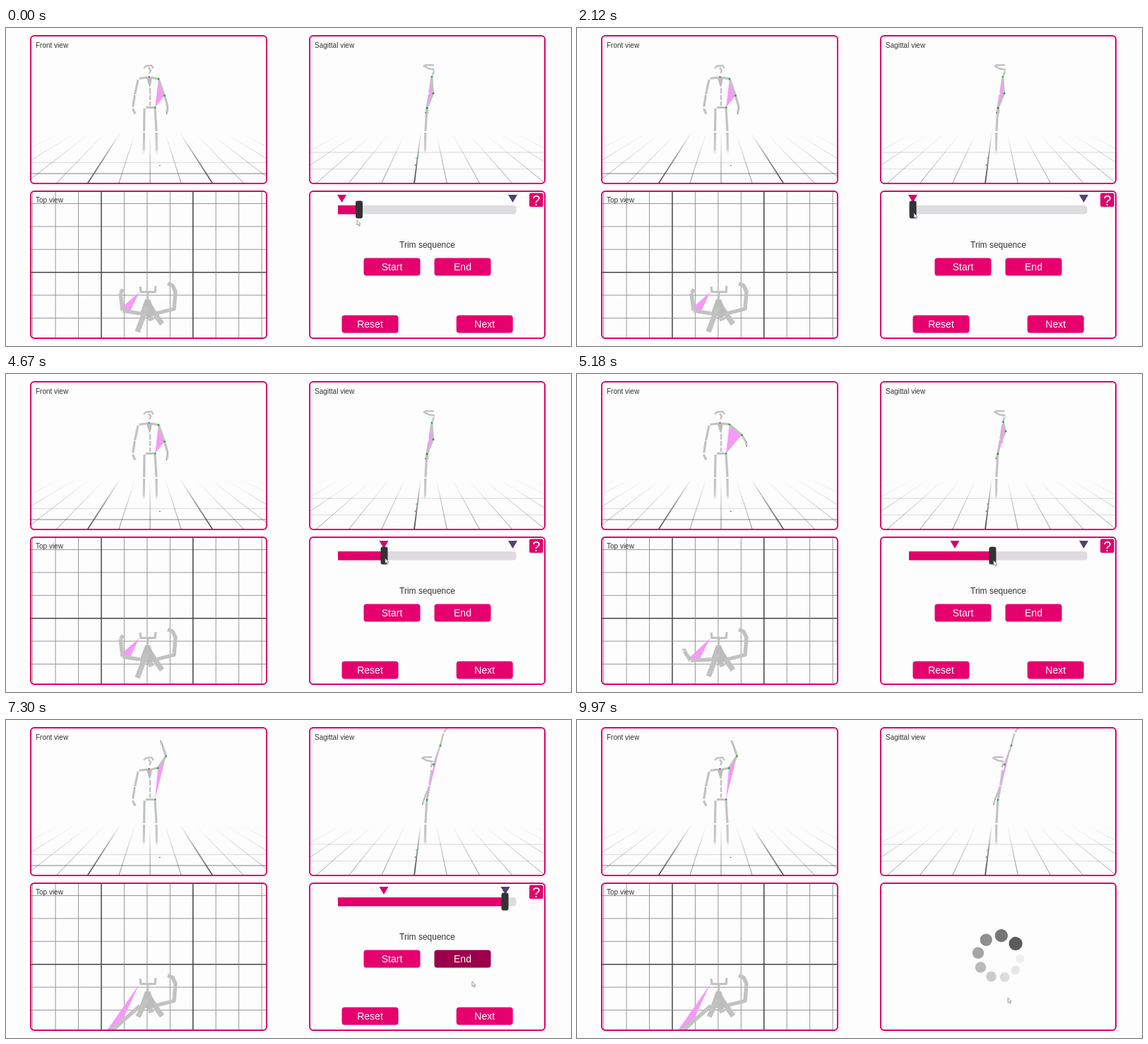
These frames come from a looping animation (800x450 px, 10000 ms). An HTML page:

```html
<!DOCTYPE html>
<html lang="en">
<head>
<meta charset="utf-8">
<title>Trim sequence</title>
<style>
html, body { margin: 0; width: 100%; height: 100%; overflow: hidden; background: #fefdfe; }
svg { display: block; width: 800px; height: 450px; font-family: "Liberation Sans", Arial, sans-serif; }
.frame { fill: none; stroke: #de0069; stroke-width: 2; }
.label { font-size: 10px; fill: #333; }
.bone { fill: none; stroke: #c3c2c3; stroke-width: 3.2; }
.thin { stroke-width: 2.4; }
.wide { stroke-width: 5.4; }
.foot { stroke-width: 7.5; }
.area { fill: #f49bf5; }
.joint { fill: #17b32b; }
.speck { fill: #333; }
.btn rect { fill: #e6006e; }
.btn.dark rect { fill: #9c004a; }
.btn text { fill: #fff; font-size: 14px; text-anchor: middle; }
</style>
</head>
<body>
<svg viewBox="0 0 800 450">
  <defs>
    <clipPath id="cFront"><rect x="35" y="11" width="334" height="209" rx="5"/></clipPath>
    <clipPath id="cSide"><rect x="430" y="11" width="333" height="209" rx="5"/></clipPath>
    <clipPath id="cTop"><rect x="35" y="231" width="334" height="208" rx="5"/></clipPath>
    <linearGradient id="floor" gradientUnits="userSpaceOnUse" x1="0" y1="220" x2="0" y2="148">
      <stop offset="0" stop-color="#333"/>
      <stop offset=".5" stop-color="#555" stop-opacity=".7"/>
      <stop offset="1" stop-color="#777" stop-opacity="0"/>
    </linearGradient>
    <linearGradient id="leg" gradientUnits="userSpaceOnUse" x1="0" y1="150" x2="0" y2="181">
      <stop offset="0" stop-color="#c3c2c3"/>
      <stop offset=".7" stop-color="#cfcecf"/>
      <stop offset="1" stop-color="#fff" stop-opacity="0"/>
    </linearGradient>
  </defs>

  <g clip-path="url(#cFront)">
    <g id="gridFront"></g>
    <path class="bone" style="stroke:url(#leg)" d="M195.5 148L195 181M213 148L213.5 181"/>
    <path class="bone" d="M196 114L195.5 146M211 114L213 146M198 112.5H209"/>
    <path class="bone thin" d="M204 85V93M204 95V102M204 104V110"/>
    <path class="bone" d="M188.5 71.5L200 70M187 73L182.5 94M182 97L179.7 111.5M179.3 114L183 121.5"/>
    <path class="bone thin" d="M195 57L198 54L206 53L209 57M202 56L205 60L203 64"/>
    <path fill="#bcbbbc" d="M198.5 69H207L205 81L203 84Z"/>
    <circle class="speck" cx="202.5" cy="69" r=".9"/>
    <circle class="speck" cx="182" cy="96" r=".8"/>
    <circle class="speck" cx="217.8" cy="194.5" r=".7"/>
    <g id="front"></g>
  </g>

  <g clip-path="url(#cSide)">
    <g id="gridSide"></g>
    <path class="bone" style="stroke:url(#leg)" d="M593.8 148L593.3 181"/>
    <path class="bone" d="M595.8 114L594 146"/>
    <circle class="joint" cx="581" cy="184" r=".8"/>
    <circle class="speck" cx="579.5" cy="194" r=".8"/>
    <g id="side"></g>
  </g>

  <g clip-path="url(#cTop)">
    <g id="gridTop"></g>
    <path class="bone" d="M190 366L191 373.5H211L212 365M201 374L200 386"/>
    <path class="bone wide" stroke-linejoin="round" d="M206 403L212 404L238 397.5L240 373L236 364.5L229 361.5"/>
    <path class="bone foot" d="M203 393L221 419M200 398L206 414"/>
    <path fill="#bdbcbd" d="M197 384H204L212 405L203 409L189 406Z"/>
    <g id="top"></g>
  </g>

  <rect class="frame" x="35" y="11" width="334" height="209" rx="5"/>
  <rect class="frame" x="430" y="11" width="333" height="209" rx="5"/>
  <rect class="frame" x="35" y="231" width="334" height="208" rx="5"/>
  <rect class="frame" x="430" y="231" width="333" height="208" rx="5"/>
  <text class="label" x="42" y="27.5">Front view</text>
  <text class="label" x="437" y="27.5">Sagittal view</text>
  <text class="label" x="42" y="247">Top view</text>

  <g id="controls">
    <rect x="470" y="251" width="252.5" height="12.5" rx="4" fill="#dedcdf"/>
    <rect id="fill" x="470" y="251" height="12.5" fill="#e1006b"/>
    <path id="startMark" d="M-6.5 236H6.5L0 247Z" fill="#d80067"/>
    <path id="endMark" d="M-6.5 236H6.5L0 247Z" fill="#55406f"/>
    <rect id="knob" x="-5" y="244.5" width="10" height="25" rx="3" fill="#343234"/>
    <rect x="741" y="233.5" width="19.5" height="19.5" rx="2" fill="#e1006b"/>
    <text x="750.7" y="250.5" font-size="20" text-anchor="middle" fill="#fff">?</text>
    <text x="596.5" y="310.5" font-size="12" text-anchor="middle" fill="#333">Trim sequence</text>
    <g id="buttons"></g>
  </g>
  <g id="spinner"></g>
  <path id="cursor" d="M0 0V7L1.7 5.6L3 8.3L4.2 7.7L3 5.2H5Z" fill="#fff" stroke="#777" stroke-width=".7"/>
</svg>

<script>
const LOOP = 10000, LOADING = 7950;
const $ = id => document.getElementById(id);

function add(parent, tag, attrs) {
  const el = document.createElementNS("http://www.w3.org/2000/svg", tag);
  for (const k in attrs) el.setAttribute(k, attrs[k]);
  return parent.appendChild(el);
}
const line = (id, x1, y1, x2, y2, stroke, width, opacity = 1) =>
  add($(id), "path", { d: `M${x1} ${y1}L${x2} ${y2}`, stroke, "stroke-width": width, opacity });
const moveTo = (id, x, y = 0) => $(id).setAttribute("transform", `translate(${x} ${y})`);

const clamp = u => Math.min(1, Math.max(0, u));
const smooth = u => u * u * (3 - 2 * u);
const mix = (a, b, u) => a + (b - a) * u;

// Floor lines run from the lower edge toward the vanishing point (vx, 83).
function floor(id, vx, x0, step, isBold) {
  const shrink = (148 - 83) / (220 - 83);
  for (let i = -11; i <= 11; i++) {
    const x = x0 + step * i, bold = isBold(i);
    line(id, x, 220, vx + (x - vx) * shrink, 148, "url(#floor)", bold ? 1.7 : .9,
      (bold ? 1 : .7) / (1 + Math.abs(x - vx) / 500));
  }
}
floor("gridFront", 204, 204, 44.3, i => Math.abs(i) === 2);
floor("gridSide", 595.6, 578, 46.4, i => i === 0);
line("gridFront", 35, 206, 369, 206, "#444", .9, .75);
line("gridFront", 35, 190.5, 369, 190.5, "#444", .9, .2);
line("gridSide", 430, 199.5, 763, 199.5, "#444", .9, .2);
line("gridSide", 430, 176, 763, 176, "#444", .9, .22);

for (let i = 0; i < 11; i++) {
  const x = 37.6 + 32.45 * i, bold = i % 4 === 3, style = bold ? ["#444", 1.5] : ["#8c8c8c", .9];
  line("gridTop", x, 231, x, 440, ...style);
  const y = 248.5 + 32.4 * i;
  if (y < 440) line("gridTop", 35, y, 369, y, ...style);
}

const buttons = [["Start", 506.5, 325.5], ["End", 606.5, 325.5], ["Reset", 475.5, 406.5], ["Next", 637.7, 406.5]]
  .map(([name, x, y]) => {
    const el = add($("buttons"), "g", { class: "btn" });
    add(el, "rect", { x, y, width: 80, height: 25, rx: 4 });
    add(el, "text", { x: x + 40, y: y + 17.5 }).textContent = name;
    return { el, has: ([px, py]) => px > x && px < x + 80 && py > y && py < y + 25 };
  });

// Dots shrink, pale and move closer together behind the leading one.
for (let i = 0; i < 9; i++) {
  const a = -(45.5 * i - .85 * i * (i - 1)) * Math.PI / 180;
  const grey = mix(91, 238, 1 - (1 - i / 8) ** 1.5);
  add($("spinner"), "circle", {
    cx: 30 * Math.sin(a), cy: -30 * Math.cos(a), r: 9.6 - i * .46, fill: `rgb(${grey},${grey},${grey})`
  });
}

const stops = [
  [300, 497, 272], [900, 678, 414], [1200, 678, 414], [1330, 663, 396], [2100, 477, 262],
  [2970, 542, 264], [3200, 537, 261], [3700, 548, 338], [3950, 548, 338], [4500, 537, 261],
  [4700, 537, 261], [6000, 708, 270], [6180, 708, 270], [6450, 646, 336], [7050, 646, 336],
  [7600, 678, 414], [LOADING, 678, 414], [8450, 660, 427], [LOOP, 610, 393]
];
function cursorAt(t) {
  const i = Math.max(1, stops.findIndex(s => s[0] > t));
  const [t0, x0, y0] = stops[i - 1], [t1, x1, y1] = stops[i];
  const u = smooth(clamp((t - t0) / (t1 - t0)));
  return [mix(x0, x1, u), mix(y0, y1, u)];
}

// The knob follows the cursor during the two drags and rests in between.
function knobAt(t) {
  if (t < 1130) return 500;
  const held = t < 4700 ? Math.min(3200, Math.max(2100, t)) : Math.min(6000, t);
  return cursorAt(held)[0] - 1.5;
}

// A joint swings from rest to raised, bowing out by (bx, by) halfway.
const swing = (u, x0, y0, x1, y1, bx = 0, by = 0) => {
  const bow = Math.sin(Math.PI * u);
  return [mix(x0, x1, u) + bx * bow, mix(y0, y1, u) + by * bow];
};

function bone([x1, y1], [x2, y2], cls = "", gap = 1.1) {
  const d = Math.hypot(x2 - x1, y2 - y1) || 1, dx = (x2 - x1) / d * gap, dy = (y2 - y1) / d * gap;
  return `<path class="bone ${cls}" d="M${x1 + dx} ${y1 + dy}L${x2 - dx} ${y2 - dy}"/>`;
}
const chain = (joints, cls, gap) => joints.slice(1).map((p, i) => bone(joints[i], p, cls, gap)).join("");
const dot = ([x, y], r = 1.5, cls = "joint") => `<circle class="${cls}" cx="${x}" cy="${y}" r="${r}"/>`;
const speck = p => dot(p, .8, "speck");
const area = (...points) => `<polygon class="area" points="${points}"/>`;

function drawFront(u) {
  const shoulder = swing(u, 216, 72, 215, 68), elbow = swing(u, 224.5, 95.5, 226.5, 51, 14);
  const wrist = swing(u, 229, 112, 221.5, 36, 20), hand = swing(u, 227.5, 121, 219, 30, 24);
  const hip = [211, 112.5];
  $("front").innerHTML = area(shoulder, elbow, hip) +
    chain([[205, 70], shoulder, elbow, wrist, hand]) +
    [shoulder, elbow, hip].map(p => dot(p)).join("") + speck(wrist) + speck(hand);
}

function drawSide(u) {
  const shoulder = swing(u, 603, 69, 605.5, 63), elbow = swing(u, 605, 92.5, 615, 36);
  const wrist = swing(u, 597, 112, 619.5, 18), hand = swing(u, 597, 122, 625, 11);
  const farWrist = swing(u, 596.5, 113, 592, 112), farHand = swing(u, 594, 120, 590, 119);
  const waist = [599.5, 93], hip = [596, 113];
  $("side").innerHTML =
    `<path class="bone thin" transform="translate(${-2.5 * u})" d="M606 52.5H594L592 54L599 57.5L607 59M606 61L604 67"/>` +
    chain([[603, 70], waist, hip]) + chain([waist, farWrist, farHand], "thin") +
    area(shoulder, elbow, hip) + chain([shoulder, elbow, wrist, hand], "thin") +
    [shoulder, elbow, hip].map(p => dot(p)).join("") + speck(farWrist) + speck(farHand);
}

function drawTop(u) {
  const shoulder = [190, 404], elbow = swing(u, 165, 400, 145, 444, 0, -6);
  const wrist = swing(u, 162, 375, 130, 458, -6), hand = swing(u, 166, 369.5, 126, 462, -10);
  const inner = [0, 1].map(k => mix(elbow[k], shoulder[k], .42));
  $("top").innerHTML = area([188.5, 374], [elbow[0] - 4, elbow[1] - 2], inner) +
    chain([shoulder, elbow, wrist, hand], "wide", .3) +
    bone([199, 395], swing(u, 186, 430, 187, 420), "foot", 0);
}

function render(t) {
  const v = knobAt(t), tip = cursorAt(t), raise = smooth(clamp((v - 540) / 166));
  drawFront(raise);
  drawSide(raise);
  drawTop(raise);

  const loading = t >= LOADING;
  $("controls").style.display = loading ? "none" : "";
  $("spinner").style.display = loading ? "" : "none";
  $("fill").setAttribute("width", v > 476 ? v - 470 : 0);
  moveTo("knob", v);
  moveTo("startMark", t < 3850 ? 475.5 : 535);
  moveTo("endMark", t < 7000 ? 717.5 : 707);

  // Hover colour fades late, so it also looks a moment back.
  const earlier = cursorAt(t - 150);
  for (const b of buttons) b.el.classList.toggle("dark", b.has(tip) || b.has(earlier));

  const turn = 6.9 + (t - 8450) * 404.7 / 1520;
  $("spinner").setAttribute("transform", `translate(597.5 335) rotate(${turn})`);
  moveTo("cursor", ...tip);
}

const begin = performance.now();
function tick() {
  render((performance.now() - begin) % LOOP);
  requestAnimationFrame(tick);
}
tick();
</script>
</body>
</html>
```
